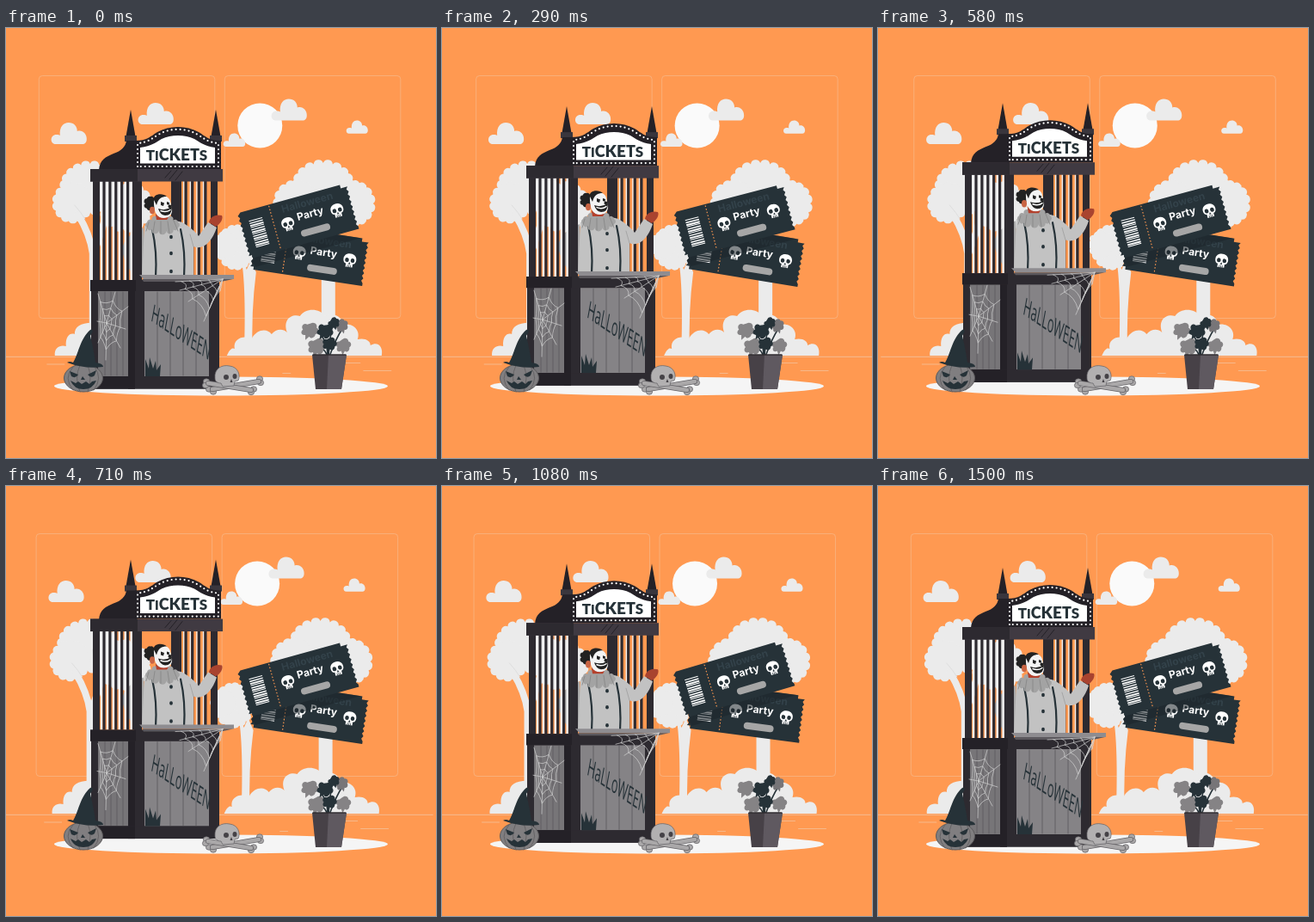
An HTML page that plays this animation: 500 by 500 pixels, repeating every 1.54 s.

```html
<!DOCTYPE html>
<html lang="en">
<head>
<meta charset="utf-8">
<title>Halloween tickets</title>
<style>
  html, body { margin: 0; height: 100%; overflow: hidden; background: #ff9951; }
  svg { display: block; width: 100vw; height: 100vh; }
</style>
</head>
<body>
<svg id="stage" viewBox="0 0 500 500"></svg>
<script>
const INK = '#263238', DARK = '#2d2a30', DARKER = '#242127', PALE = '#ebebeb', SKY = '#ff9951';

// ---- shape helpers ----
const path = (d, fill, extra = '') => `<path d="${d}" fill="${fill}" ${extra}/>`;
const line = (d, color, width = 1, extra = '') =>
  `<path d="${d}" fill="none" stroke="${color}" stroke-width="${width}" stroke-linecap="round" ${extra}/>`;
const rect = (x, y, w, h, fill, extra = '') =>
  `<rect x="${x}" y="${y}" width="${w}" height="${h}" fill="${fill}" ${extra}/>`;
const oval = (x, y, rx, ry, fill, extra = '') =>
  `<ellipse cx="${x}" cy="${y}" rx="${rx}" ry="${ry}" fill="${fill}" ${extra}/>`;
const repeat = (n, fn) => Array.from({ length: n }, (_, i) => fn(i)).join('');

// Ellipse with a scalloped rim
function frill(cx, cy, rx, ry, n, fill) {
  const r = Math.PI * (rx + ry) / n * .56;
  const point = i => {
    const a = i / n * 2 * Math.PI;
    return `${(cx + rx * Math.cos(a)).toFixed(1)} ${(cy + ry * Math.sin(a)).toFixed(1)}`;
  };
  return path(`M${point(0)}` + repeat(n, i => `A${r} ${r} 0 0 1 ${point(i + 1)}`) + 'Z', fill);
}

// Spokes from a centre, joined by sagging rings
function web(cx, cy, ends, rings, closed) {
  const spokes = ends.map(([x, y]) => `M${cx} ${cy}L${x} ${y}`).join('');
  const ring = k => {
    const pts = ends.map(([x, y]) => [cx + (x - cx) * k, cy + (y - cy) * k]);
    if (closed) pts.push(pts[0]);
    return pts.map(([x, y], i) => {
      if (!i) return `M${x} ${y}`;
      const mx = (x + pts[i - 1][0]) / 2, my = (y + pts[i - 1][1]) / 2;
      return `Q${mx + (cx - mx) * .15} ${my + (cy - my) * .15} ${x} ${y}`;
    }).join('');
  };
  return line(spokes + rings.map(ring).join(''), '#d2d2d2', .7);
}

const cloud = (x, y, scale = 1) => path(
  'M5 25C-2 25 -2 14 6 14C8 14 9 14 10 15C9 5 14 0 20 0C26 0 30 4 30 10C36 8 41 13 41 19C41 23 39 25 36 25Z',
  PALE, `transform="translate(${x} ${y}) scale(${scale})"`);

const skull = (x, y) => `<g transform="translate(${x} ${y})">` +
  path('M-7.5 -1C-7.5 -10 7.5 -10 7.5 -1C7.5 2 6 4 4 4V8H-4V4C-6 4 -7.5 2 -7.5 -1Z', '#fff') +
  oval(-3.3, 0, 2.3, 2.5, INK) + oval(3.3, 0, 2.3, 2.5, INK) + path('M0 2l1.3 2.6h-2.6Z', INK) +
  line('M-1.8 6v2M0 6v2M1.8 6v2', INK, .7) + '</g>';

// ---- scenery ----
const panel = x => rect(x, 55.5, 204.5, 282, 'none', 'rx="4" stroke="#f6b98c" stroke-width=".7"');

function scenery() {
  return line('M0 382.3H500', '#f2c6a4', .8, 'style="stroke-linecap:butt"') +
    line('M48 391H68M390 389.5H412M416 398.5H448M322 401.5H331', '#f2c6a4', .7) +
    panel(38.5) + panel(254.5) +
    oval(295.5, 113.5, 26, 26, '#fafafa') +
    cloud(53, 110) + cloud(154, 87) + cloud(309, 82.5) + cloud(396, 107.5, .61) + cloud(253, 122.5, .62) +
    // left tree
    frill(98, 186, 34, 28, 20, PALE) + frill(78, 203, 22, 22, 14, PALE) + frill(140, 208, 30, 26, 15, PALE) +
    line('M84 217Q98 240 101 262V381M116 219Q109 245 102 262', PALE, 8) +
    line('M80 206Q88 215 92 222M104 190L106 214', '#dedede', 1) +
    // small tree
    frill(268, 255, 21, 25, 15, PALE) + frill(256, 252, 13, 15, 11, PALE) +
    path('M272 260Q280 290 277 381H287Q285 330 291 284L285 270L280 281Z', PALE) +
    // large tree
    frill(369, 186, 36, 29, 20, PALE) + frill(338, 203, 25, 24, 15, PALE) +
    frill(404, 204, 23, 25, 15, PALE) + rect(310, 216, 100, 18, PALE, 'rx="9"') +
    path('M367 225V350H383V225Z', PALE) +
    // bushes
    path('M57 381C56 371 64 368 70 370C69 358 75 354 80 356C80 347 88 342 104 343V381Z', PALE) +
    path('M257 381C261 372 264 372 266 373C264 361 276 357 286 361C292 350 304 349 309 356' +
         'C314 350 322 349 327 354C322 340 331 332 342 335C349 325 365 326 371 335' +
         'C382 330 392 336 391 345C404 342 413 352 409 362C418 360 424 364 424 369C433 364 439 371 437 381Z', PALE);
}

// ---- tickets ----
const W = 66, H = 27.5;
const ticketShape = `M${4 - W} ${-H}H${W - 8}V${4 - H}H${W}` + repeat(8, () => 'l-2 3l2 3') +
  `V${H}H${4 - W}V${H - 3.5}H${-W}` + repeat(8, () => 'l2 -3l-2 -3') + 'Z';
const ticketText = (y, color, text) =>
  `<text x="16" y="${y}" text-anchor="middle" font-family="Inter, sans-serif" font-weight="700" font-size="12" fill="${color}">${text}</text>`;

function ticket(x, y, angle, shadow = '') {
  return `<g transform="translate(${x} ${y}) rotate(${angle})">` + path(ticketShape, INK) +
    line(`M-28 ${-H + 2}V${H - 2}`, SKY, 1.2, 'stroke-dasharray="0.6 3.2"') +
    repeat(13, i => rect(-55, -15.5 + i * 2.6, 16, 1 + i * 7 % 3 * .45, '#fff')) +
    skull(-12, 0) + skull(47.3, 0) +
    ticketText(-14, '#33424a', 'Halloween') + ticketText(-.5, '#fff', 'Party') +
    rect(-.5, 11.5, 35, 8, '#a6a6a6', 'rx="4"') + shadow + '</g>';
}

function tickets() {
  const clip = `<clipPath id="under"><path d="${ticketShape}"/></clipPath>`;
  const shadow = `<g clip-path="url(#under)">` +
    path(ticketShape, '#1c262b', 'opacity=".55" transform="rotate(-8.5) translate(-11 -28) rotate(-15.5)"') + '</g>';
  return clip + ticket(353, 263, 8.5, shadow) + ticket(339.5, 224.5, -15.5);
}

// ---- booth ----
const spire = x => path(`M${x} 95L${x + 5.5} 126H${x - 5.5}Z`, DARKER) + rect(x - 7, 125, 14, 7, '#3a363d');

const bars = (x, n, step, shine, height) => repeat(n, i =>
  rect(x + i * step, 178, shine, height, '#f1f1f1') + rect(x + i * step + shine, 178, 3.2, height, DARK));

function sign() {
  const letters = [['T', 17], ['I', 15], ['C', 18], ['K', 19], ['E', 19], ['T', 18], ['S', 17]]
    .map(([c, size]) => `<tspan font-size="${size}">${c}</tspan>`).join('');
  return path('M150 164V131C164 131 168 126 176 121C190 113 210 113 224 121C232 126 236 131 250 131V164Z', DARKER) +
    line('M153 161V134C166 133 170 128 178 123.5C191 116 209 116 222 123.5C230 128 234 133 247 134V161Z',
      '#fff', 2.2, 'stroke-dasharray="0 5"') +
    path('M156 157.5V139C170 137 174 133 181 129C192 123.5 208 123.5 219 129C226 133 230 137 243 139V157.5Z', '#fff') +
    `<text x="198.5" y="153.5" text-anchor="middle" font-family="Lato, sans-serif" font-weight="900" fill="${INK}">${letters}</text>`;
}

function clown() {
  return path('M160 232C146 238 136 246 135 258C137 272 144 282 150 290H164Z', '#a9a9a9') +
    path('M161 230C172 224 196 222 205 226C215 232 220 237 224 242L235 226L245 232C240 248 229 259 218 254V290H158Z', '#c2c2c2') +
    line('M218 254L214 240', '#9d9d9d', .8) +
    path('M236 226C237 220 243 216 251 218C253 222 249 228 244 231Z', '#a9432f') +
    line('M170 234Q176 260 174 290M203 234Q209 260 207 290', INK, 2.2) +
    [243, 262, 283].map(y => oval(192, y, 1.9, 2.2, INK)).join('') +
    path('M174 212H188V226H174Z', '#b5573a') +
    frill(182, 229, 20, 7, 14, '#a3a3a3') +
    line('M166 226L163 236M173 225L171 238M180 225V239M188 225L190 239M195 224L200 236', '#858585', .8) +
    frill(168, 204, 6, 8, 8, '#222') +
    path('M172 203C171 195 181 192 188 197C192 200 191 205 193 210C194 218 188 222 181 221C174 219 172 212 172 203Z', '#f3f3f3') +
    path('M172 200C170 193 182 191 187 196C181 196 177 198 175 206Z', '#222') +
    oval(170, 212, 3, 4.2, '#c96544') +
    path('M174 217Q180 223 189 220L187 223H175Z', '#b5402c') +
    path('M177 210Q185 213 193 208Q193 218 185 218Q179 217 177 210Z', '#222') +
    line('M180 212.5Q186 215 191 211.5', '#fff', 1.5) +
    path('M180 202l4 1.5l-1 3.5l-3 -1ZM187 202l3 1l-.5 3l-2.5 -1Z', '#222') + oval(190.5, 207.5, 2, 2, '#222');
}

function booth() {
  const planks = (x, n, step) => line(repeat(n, i => `M${x + i * step} 307V404`), '#5f5d60', .9);
  return spire(145) + spire(244) +
    path('M108 165C109 153 116 150 125 146C134 143 139 138 140 131H152V165Z', DARKER) +
    // window area; the clown leans out past the right-hand post
    rect(192, 178, 12, 112, DARK) + bars(206, 4, 7.6, 1.5, 110) + rect(238, 176, 8, 114, DARK) +
    clown() +
    bars(110, 6, 6.9, 2.4, 115) + rect(101, 176, 8, 120, DARK) + rect(149, 176, 9, 118, DARK) +
    rect(98, 164, 154, 14.5, '#403a42') + rect(98, 164, 55, 14.5, DARK) +
    line('M185 174l7 -8M190 176l9 -11M197 177l8 -10', DARKER, 1) +
    sign() +
    // lower cabinet
    rect(99, 300, 149, 119.5, DARK) +
    rect(107, 306, 35, 99, '#777578') + rect(161, 306, 75, 99, '#858386') +
    planks(115, 4, 7) + planks(176, 4, 15) +
    rect(142, 300, 8, 119.5, DARKER) +
    rect(98, 293, 150, 13, DARK) + rect(98, 293, 53, 13, DARKER) +
    rect(98, 405, 152, 14.5, DARK) + rect(98, 405, 52, 14.5, DARKER) +
    path('M155 287H265V292H160Z', '#8e8c90') + path('M158 292H264L250 295H160Z', '#5b585d') +
    web(117, 343, [[107, 309], [127, 307], [142, 324], [139, 350], [133, 372], [116, 386], [107, 366], [106, 341]], [.25, .48, .72], true) +
    web(252, 292, [[197, 295], [202, 305], [212, 318], [230, 341], [238, 322], [249, 306]], [.3, .5, .7, .88], false) +
    `<text transform="matrix(.44 .3 -.18 1 168 340)" font-family="Open Sans, sans-serif" font-size="27" fill="${INK}">HaLLoWEEN</text>` +
    path('M162 405V385L166 396L167 383L171 396L174 387L175 398L180 391L179 405Z', INK);
}

// ---- ground props ----
function pumpkin() {
  return oval(90, 407, 22.5, 16, '#807e80', 'stroke="#5c5a5c"') +
    line('M78 394Q66 407 78 421M86 392Q79 407 86 423M95 392Q101 407 95 423M103 394Q113 407 102 421', '#656365', 1) +
    path('M74 399l10 4q-3 5 -8 2ZM105 398l-10 5q4 5 8 1ZM89 405l3 4h-5Z', INK) +
    path('M75 410l6 3l3 -2l4 3l5 -3l4 3l3 -3l5 -1q-4 10 -15 10t-15 -10Z', INK) +
    path('M78 389C84 380 86 361 98 351C102 350 101 354 98 358C101 371 103 382 104 389Q113 390 113 394Q92 397 71 389Q74 387 78 389Z', INK);
}

function bones() {
  const bone = d => line(d, '#646266', 6) + line(d, '#aaa8a9', 4.6);
  const knob = (x, y) => oval(x, y, 3.6, 3.2, '#aaa8a9', 'stroke="#646266" stroke-width=".7"');
  return knob(295, 408) + knob(296, 412.5) + knob(236, 420) + knob(241, 423) + bone('M240 420L294 411') +
    knob(233, 411) + knob(232, 415.5) + knob(288, 420) + knob(285, 423.5) + bone('M235 413L285 421') +
    path('M243 407C242 396 251 391 260 393C270 394 273 404 270 410L266 411L265 416L252 417L250 413C246 413 243 411 243 407Z',
      '#b2b0b1', 'stroke="#646266" stroke-width=".7"') +
    oval(256, 406, 3, 3, '#454247') + oval(266, 405, 2.5, 3, '#454247') + path('M262 408l1.5 4h-3Z', '#454247');
}

function plant() {
  // A lobed leaf drooping at an angle
  const leaf = (x, y, size, angle, color) => path(
    'M0 -8C4 -11 9 -8 8 -4C12 -3 12 3 8 4C8 9 3 11 1 8L-3 13L-4 7C-9 9 -11 4 -8 1C-12 -3 -8 -8 -4 -6Z',
    color, `transform="translate(${x} ${y}) rotate(${angle}) scale(${size})"`);
  return line('M374 382Q374 362 361 352M375 382Q377 355 380 345M376 382Q384 360 391 350M374 382Q370 370 358 370', INK, 1.6) +
    leaf(353, 351, .95, 10, '#858385') + leaf(361, 370, 1, 0, '#858385') +
    leaf(390, 346, .75, -30, '#777578') + leaf(392, 369, .85, -10, '#858385') +
    leaf(371, 352, .9, 20, INK) + leaf(381, 343, .65, -30, INK) + leaf(376, 367, .8, 0, INK) +
    path('M356 380H396L390 420H360Z', '#474147') + path('M375 380H396L390 420H373Z', '#5f5960') +
    line('M357 380H395', '#302d31', 1.4);
}

document.getElementById('stage').innerHTML =
  rect(0, 0, 500, 500, SKY) +
  `<g id="scenery">${scenery()}</g>` +
  oval(250, 416.5, 194, 11, '#f5f5f5') +
  `<g id="tickets">${tickets()}</g>` +
  `<g id="booth">${booth()}</g>` +
  pumpkin() + bones() + plant();

// ---- motion ----
const LOOP = 1540, TICK = 1000 / 24, PERIOD = 1500, LEAD = 30;

// Evenly spaced stops over one period, joined linearly
const SHAKE = [0, -1, 2, -4, 4, -4, 4, -4, 2, -1, 0];
const FLOAT = [.4, -9.6, .4];
const WIND = [0, 1, 0, -1, 0];

function along(stops, phase) {
  const at = phase * (stops.length - 1), i = Math.floor(at);
  return stops[i] + (stops[i + 1] - stops[i]) * (at - i);
}

const place = (id, transform) => document.getElementById(id).setAttribute('transform', transform);

function draw(now) {
  const t = Math.floor((now % LOOP + 4) / TICK) * TICK; // 24 pictures a second
  const phase = (t + LEAD) % PERIOD / PERIOD;
  place('scenery', `translate(${along(SHAKE, phase)} 0)`);
  place('booth', `translate(0 ${along(FLOAT, phase)})`);
  place('tickets', `rotate(${along(WIND, phase)} 345 242)`);
  requestAnimationFrame(draw);
}
draw(performance.now());
</script>
</body>
</html>
```
